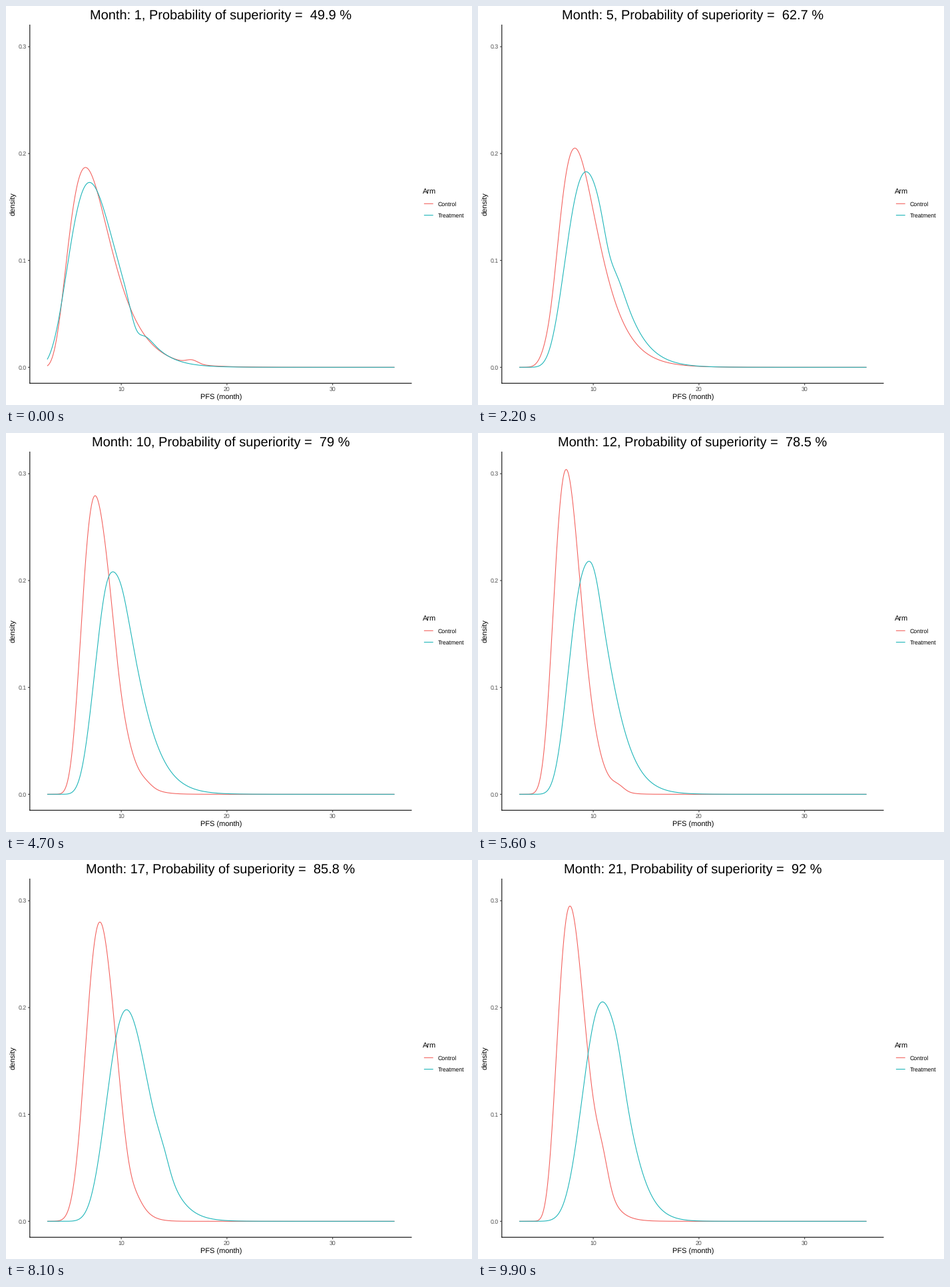
A matplotlib script that plays this animation: 700x600 px, repeating every 10 s.

```python
import numpy as np
import matplotlib.pyplot as plt
from matplotlib.animation import FuncAnimation

W, H, DPI = 700, 600, 100
FRAMES, INTERVAL = 100, 100
MONTHS = 21
RED, TEAL = "#F35E5A", "#17B3B7"
PX = 72 / DPI                       # points per pixel
X = np.linspace(3, 35.85, 700)      # survival in months

# Key months with the probability of superiority, and for each arm
# (mode, peak, skew, bump position, bump height)
KEYS = [
    (1, 49.9, (6.62, .187, .385, 16.7, .0035), (7.00, .173, .28, 11.4, -.014)),
    (5.44, 62.7, (8.26, .205, .37, 5.4, .010), (9.33, .183, .27, 11.5, -.014)),
    (8.68, 79.2, (7.60, .254, .28, 8.9, .018), (9.10, .195, .30, 8.6, .012)),
    (12.31, 78.5, (7.44, .304, .21, 12.4, .004), (9.40, .212, .25, 10.1, .011)),
    (14.94, 87.1, (7.98, .303, .10, 8.0, -.012), (10.4, .186, .15, 11.5, .012)),
    (17.36, 85.8, (7.98, .280, .15, 10.7, -.010), (10.5, .198, .20, 14.0, .008)),
    (21, 92, (7.80, .295, .25, 10.9, .018), (10.85, .205, .15, 12.3, .009)),
]
times, probs, controls, treatments = (np.array(c) for c in zip(*KEYS))


def sx(month):
    return 173.1 + 15.88 * (month - 10)


def sy(density):
    return 543.3 - 1607 * density


def lognormal(mode, peak, skew):
    """Skewed bell of unit area with the given mode and peak height."""
    width = np.exp(-skew ** 2 / 2) / (peak * np.sqrt(2 * np.pi))
    z = np.log(np.maximum(1 + skew * (X - mode) / width, 1e-9)) / skew
    return peak * np.exp(-z ** 2 / 2)


def bump(at, height):
    return height * np.exp(-((X - at) / .55) ** 2 / 2)


def density(arm, j, u):
    a, b = arm[j], arm[j + 1]
    core = lognormal(*(a[:3] + (b[:3] - a[:3]) * u))
    return np.maximum(core + (1 - u) * bump(*a[3:]) + u * bump(*b[3:]), 0)


plt.rcParams["font.family"] = "Liberation Sans"
plt.rcParams["text.hinting"] = "none"
fig = plt.figure(figsize=(W / DPI, H / DPI), dpi=DPI, facecolor="white")
ax = fig.add_axes([0, 0, 1, 1])
ax.set(xlim=(0, W), ylim=(H, 0))
ax.axis("off")


def stroke(x, y, color="black"):
    return ax.plot(x, y, color=color, lw=1.07 * PX, snap=False,
                   solid_capstyle="butt", solid_joinstyle="round")[0]


def label(x, y, s, size, color="black", **kw):
    return ax.text(x, y, s, fontsize=size * PX, color=color,
                   va="baseline", **kw)


control = stroke(sx(X), sy(0 * X), RED)
treatment = stroke(sx(X), sy(0 * X), TEAL)

stroke([35.8, 35.8], [28, 567.8])
stroke([35.3, 609.5], [567.3, 567.3])
for month in (10, 20, 30):
    x = sx(month)
    stroke([x, x], [567.5, 570.3], "#333333")
    label(x, 579, str(month), 8.8, "#4D4D4D", ha="center")
for d in (0, .1, .2, .3):
    y = sy(d)
    stroke([33, 35.8], [y, y], "#333333")
    label(30.6, y + 3.2, f"{d:.1f}", 8.8, "#4D4D4D", ha="right")
label(322.8, 592, "PFS (month)", 11, ha="center")
label(14, 298, "density", 11, ha="center", rotation=90,
      rotation_mode="anchor")

label(626, 282, "Arm", 11)
for name, y, color in (("Control", 297.3, RED), ("Treatment", 314.6, TEAL)):
    stroke([627.9, 641.7], [y, y], color)
    label(648.8, y + 3.4, name, 8.8)

title = label(322.3, 20, "", 20, ha="center")


def draw(i):
    t = 1 + (MONTHS - 1) * i / (FRAMES - 1)
    j = min(np.searchsorted(times, t, side="right"), len(times) - 1) - 1
    u = (t - times[j]) / (times[j + 1] - times[j])
    control.set_ydata(sy(density(controls, j, u)))
    treatment.set_ydata(sy(density(treatments, j, u)))
    month = round(t)
    prob = np.interp(month, np.round(times), probs)
    title.set_text(f"Month: {month}, Probability of superiority =  "
                   f"{round(prob, 1):g} %")
    return control, treatment, title


anim = FuncAnimation(fig, draw, frames=FRAMES, interval=INTERVAL,
                     repeat=True, repeat_delay=0)
plt.show()
```
